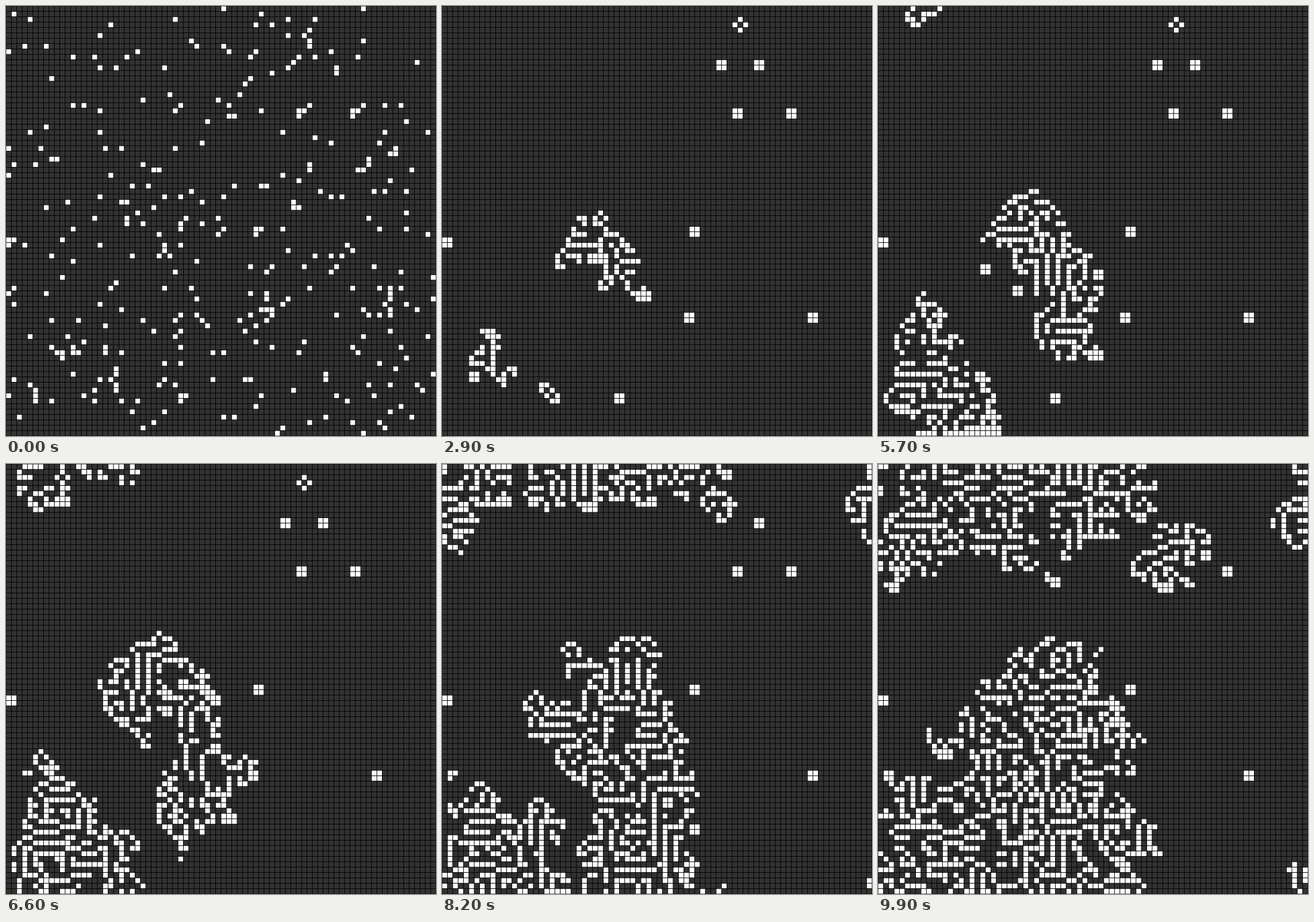
An HTML page with a canvas for the animation above (10 s loop, 748x748 px).

```html
<!DOCTYPE html>
<html>
<head>
<meta charset="utf-8">
<style>
  html, body { margin: 0; width: 100%; height: 100%; overflow: hidden; background: #333; }
  canvas { display: block; }
</style>
</head>
<body>
<canvas id="stage" width="748" height="748"></canvas>
<script>
const N = 80, SIDE = 748, SIZE = SIDE / N;
const STEPS = 100, STEP_MS = 100, SPECK_CHANCE = 0.045;
const ctx = document.getElementById('stage').getContext('2d');

// Top left corners of still blocks; each starts as three cells and fills in.
const blocks = [[54, 19], [64, 19], [46, 41], [0, 43], [32, 72]];

// Small groups that move or grow.
const groups = [
  [[56, 4], [55, 5], [56, 6], [56, 7]],
  [[29, 44], [29, 45], [28, 46], [32, 44]],
  [[71, 52], [73, 52], [71, 53], [71, 54], [70, 55], [71, 56], [71, 57]],
  [[48, 53], [48, 54], [47, 56], [48, 56], [49, 57], [48, 58]],
  [[9, 64], [10, 64], [10, 65], [12, 63], [13, 64]],
  [[20, 68], [19, 69], [20, 70], [20, 71], [21, 73]]
];

const at = (x, y) => (y + N) % N * N + (x + N) % N;

function neighbours(grid, x, y) {
  let sum = -grid[at(x, y)];
  for (let dx = -1; dx <= 1; dx++)
    for (let dy = -1; dy <= 1; dy++) sum += grid[at(x + dx, y + dy)];
  return sum;
}

// Life rules written back at once, column by column, so later cells see new neighbours.
function advance(grid) {
  for (let x = 0; x < N; x++)
    for (let y = 0; y < N; y++) {
      const i = at(x, y), n = neighbours(grid, x, y);
      grid[i] = n === 3 || (n === 2 && grid[i]) ? 1 : 0;
    }
}

// Scattered specks, gone after the first step.
function addSpecks(grid) {
  let state = 20117;
  for (let i = 0; i < grid.length; i++) {
    state = state * 48271 % 2147483647;
    if (state / 2147483647 < SPECK_CHANCE) grid[i] = 1;
  }
}

function buildSteps() {
  const grid = new Uint8Array(N * N), list = [];
  const corners = blocks.flatMap(([x, y]) => [[x, y], [x + 1, y], [x, y + 1]]);
  for (const [x, y] of [...corners, ...groups.flat()]) grid[at(x, y)] = 1;
  for (let s = 0; s < STEPS; s++) {
    list.push(grid.slice());
    advance(grid);
  }
  addSpecks(list[0]);
  return list;
}

function draw(grid) {
  ctx.fillStyle = '#333';
  ctx.fillRect(0, 0, SIDE, SIDE);
  ctx.fillStyle = '#fff';
  ctx.strokeStyle = '#000';
  ctx.lineWidth = 1;
  for (let x = 0; x < N; x++)
    for (let y = 0; y < N; y++)
      if (grid[at(x, y)]) ctx.fillRect(x * SIZE, y * SIZE, SIZE, SIZE);
  ctx.beginPath();
  for (let i = 0; i <= N; i++) {
    const p = i * SIZE;
    ctx.moveTo(p, 0);
    ctx.lineTo(p, SIDE);
    ctx.moveTo(0, p);
    ctx.lineTo(SIDE, p);
  }
  ctx.stroke();
}

const steps = buildSteps();
const start = performance.now();
let shown = -1;

function tick() {
  const step = Math.floor((performance.now() - start) / STEP_MS) % STEPS;
  if (step !== shown) draw(steps[shown = step]);
  requestAnimationFrame(tick);
}
tick();
</script>
</body>
</html>
```
